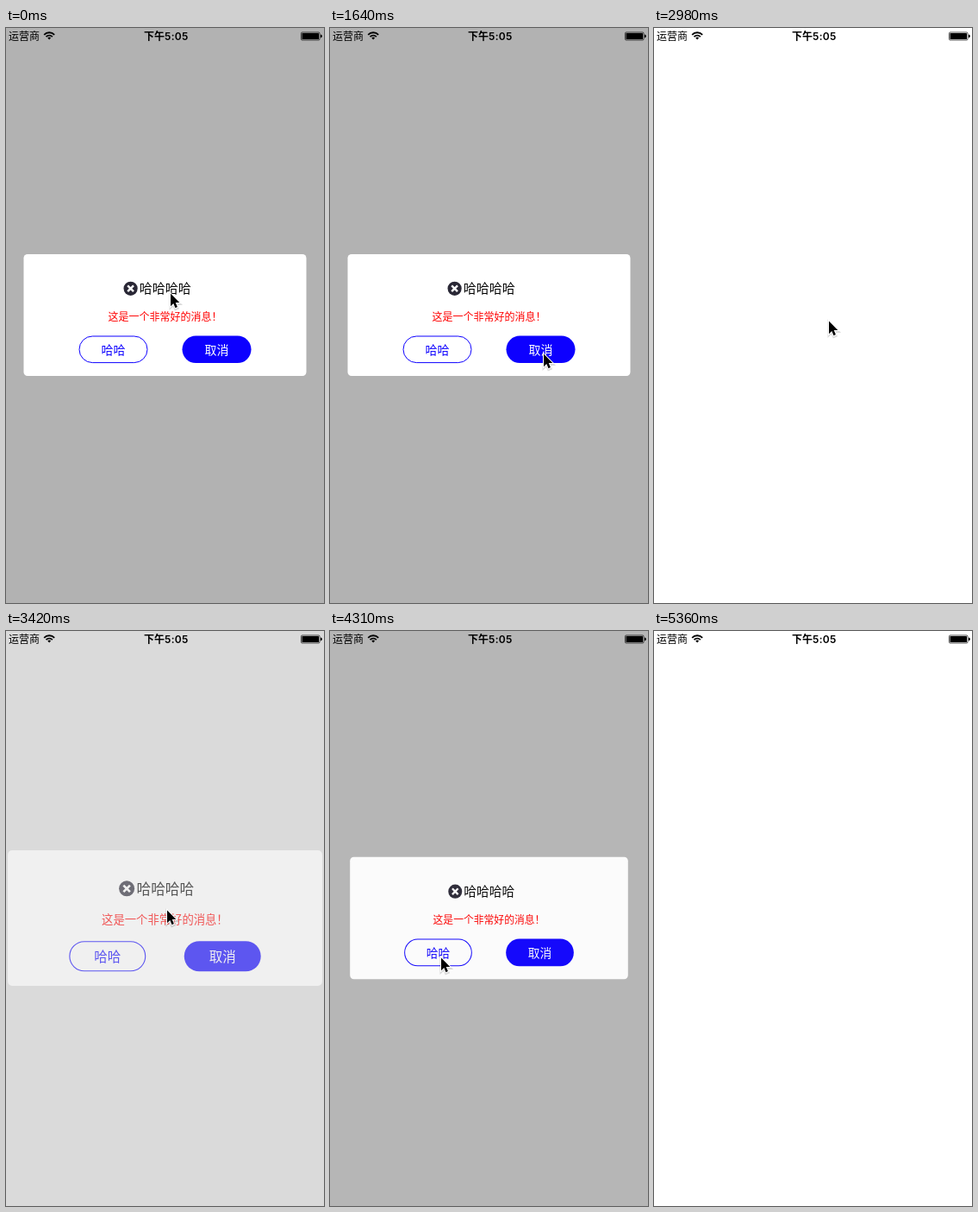
Recreate the animation shown at these times as an HTML page. Size 369 by 666 pixels, loop 5830 ms.

```html
<!DOCTYPE html>
<html lang="zh-CN">
<head>
<meta charset="utf-8">
<title>Dialog</title>
<style>
  html, body { margin: 0; width: 100%; height: 100%; overflow: hidden; background: #fff; }
  svg { display: block; width: 369px; height: 666px; }
  text { font-family: Inter, "Noto Sans CJK SC", "Noto Sans CJK", sans-serif; }
  .mid { text-anchor: middle; font-size: 14px; }
</style>
</head>
<body>
<svg viewBox="0 0 369 666">
  <rect id="dim" width="369" height="666"/>

  <g font-size="12">
    <text x="3" y="13.6">运营商</text>
    <g transform="translate(50.2 13)" fill="none" stroke="#000" stroke-width="1.8">
      <path d="M-6-5.2A8.3 8.3 0 0 1 6-5.2M-3.7-2.8A5.3 5.3 0 0 1 3.7-2.8"/>
      <path d="M0 .4L-1.9-1.5A2.8 2.8 0 0 1 1.9-1.5Z" fill="#000" stroke="none"/>
    </g>
    <text x="160" y="13.6" font-weight="600">下午<tspan letter-spacing=".3">5:05</tspan></text>
    <rect x="342.5" y="5" width="21.5" height="9" rx="1.2" fill="none" stroke="#000" stroke-width=".7"/>
    <rect x="343.5" y="6" width="19.5" height="7" rx=".5"/>
    <path d="M365 7.6q1.8 .2 1.8 1.9t-1.8 1.9z"/>
  </g>

  <g id="card">
    <rect x="20.5" y="262" width="328" height="141" rx="4.5" fill="#fff"/>
    <circle cx="144.6" cy="301.8" r="8.1" fill="#292735"/>
    <path d="M141.2 298.4l6.8 6.8m0-6.8l-6.8 6.8" stroke="#fff" stroke-width="2.4"/>
    <text x="154.8" y="307.4" font-size="15">哈哈哈哈</text>
    <text x="118.5" y="338.6" font-size="12" fill="#f00">这是一个非常好的消息！</text>
    <g fill="#0d00ff">
      <rect x="85" y="357" width="79" height="30.6" rx="15.3" fill="none" stroke="#0d00ff"/>
      <text class="mid" x="124.5" y="377.5">哈哈</text>
      <rect x="204.5" y="356.5" width="80" height="31.6" rx="15.8"/>
      <text class="mid" x="244.5" y="377.5" fill="#fff">取消</text>
    </g>
  </g>

  <g id="cursor">
    <path d="M1 2.8V17.6L4.3 14.5 6.6 19.6 9.1 18.5 6.8 13.4H11.5Z" fill="none" stroke="#000" stroke-opacity=".14" stroke-width="3"/>
    <path d="M1 1.6V16.2L4.3 13.1 6.5 18.2 8.9 17.1 6.7 12.1H11.3Z" stroke="#fff" stroke-width="2" paint-order="stroke"/>
  </g>
</svg>
<script>
const LOOP = 5830, TICK = 148.6, FADE = 350;
const [dim, card, cursor] = ["dim", "card", "cursor"].map(id => document.getElementById(id));

// Pointer path: [tick, x, y]
const path = [
  [0, 190, 306], [1, 190, 306], [3, 162, 360], [4, 147, 383], [5, 152, 390],
  [7, 206, 390], [9, 244, 381], [11, 247, 376], [17, 247, 376], [18, 235, 376],
  [19, 235, 376], [20, 202, 338], [21, 186, 322], [23, 186, 322], [25, 166, 350],
  [27, 132, 375], [28, 128, 377], [30, 128, 377], [32, 170, 440], [36, 310, 690], [40, 310, 690]
];

function ease(time, start) {
  const x = Math.min(1, Math.max(0, (time - start) / FADE));
  return (1 - Math.cos(Math.PI * x)) / 2;
}

function pose(dimmed, alpha, sx, sy) {
  dim.setAttribute("opacity", 0.302 * dimmed);
  card.setAttribute("opacity", alpha);
  card.setAttribute("transform",
    `translate(184.5 332.5) scale(${sx} ${sy}) translate(-184.5 -332.5)`);
}

function closeDialog(p) {
  pose(1 - p, 1 - p, 1 - 0.736 * p ** 1.27, 1 + 0.095 * p);
}

function openDialog(p) {
  const scale = 1.218 - 0.218 * p;
  pose(p, p ** 0.7, scale, scale);
}

function movePointer(tick) {
  const i = path.findIndex(k => k[0] > tick);
  const [t0, x0, y0] = path[i - 1], [t1, x1, y1] = path[i];
  const u = (tick - t0) / (t1 - t0);
  cursor.setAttribute("transform", `translate(${x0 + (x1 - x0) * u} ${y0 + (y1 - y0) * u})`);
}

function draw() {
  // The picture advances in discrete steps
  const tick = Math.floor((performance.now() % LOOP) / TICK);
  const time = tick * TICK;
  if (time < 2900) closeDialog(ease(time, 2225));
  else if (time < 4200) openDialog(ease(time, 3246));
  else closeDialog(ease(time, 4259));
  movePointer(tick);
  requestAnimationFrame(draw);
}
draw();
</script>
</body>
</html>
```
